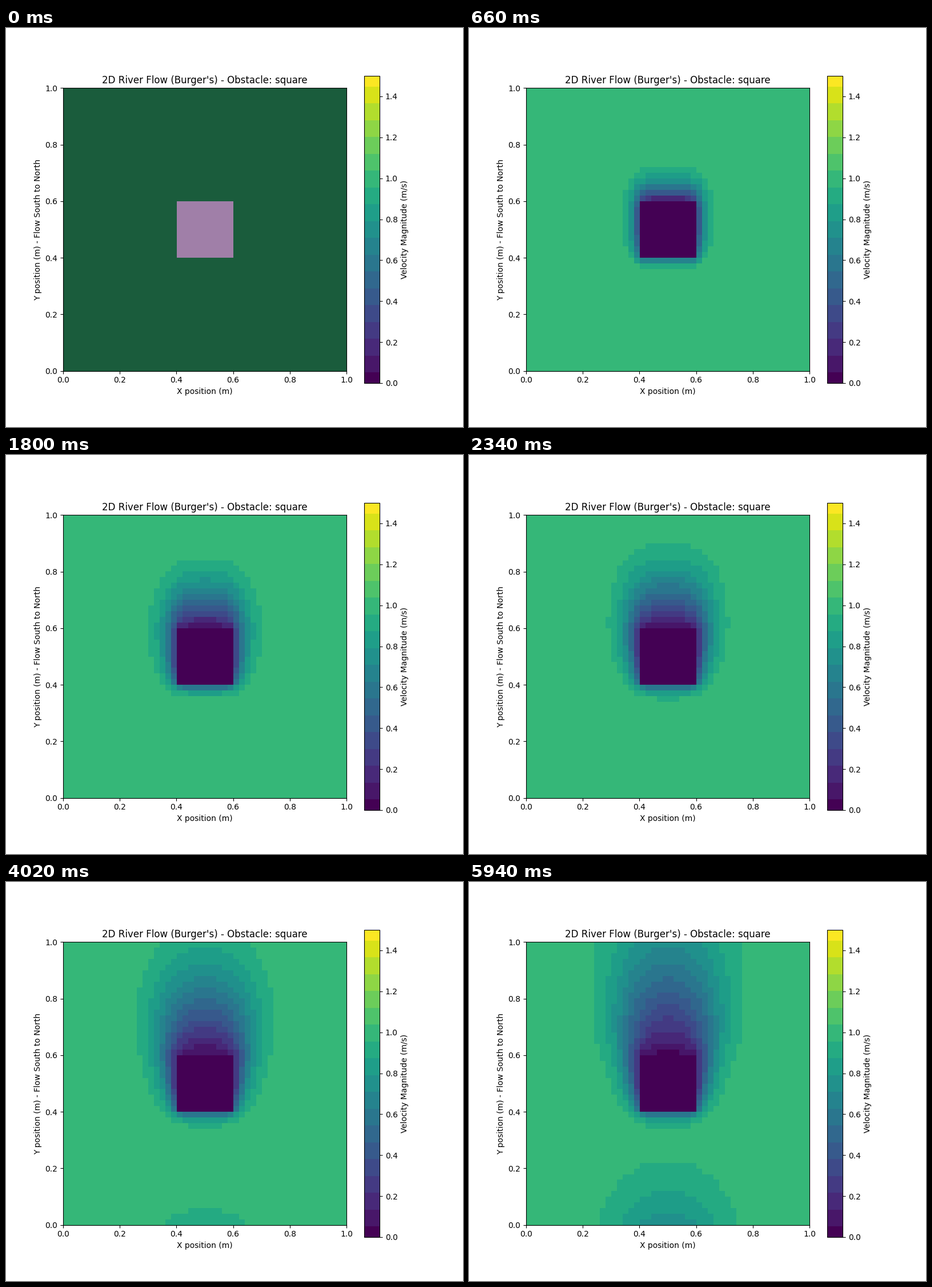
Animation, 800 px wide and 700 px high, one loop 6 s. Source, as a matplotlib script:

```python
import numpy as np
import matplotlib.pyplot as plt
from matplotlib.animation import FuncAnimation
from matplotlib.colors import ListedColormap

N = 50              # grid points per side
FRAMES = 100
INTERVAL = 60       # ms
VMAX = 1.5
DX = 1 / (N - 1)
DT = 0.005
NU = 0.01           # viscosity
BAND = 0.0825       # speed range sharing one colour
FIRST_BAND = 0.05


def banded_viridis():
    """Viridis reduced to flat bands, each with the colour of its middle."""
    values = np.linspace(0, VMAX, 256)
    band = np.floor((values - FIRST_BAND) / BAND)
    mids = FIRST_BAND + (band + 0.5) * BAND
    mids[values < FIRST_BAND] = 0
    return ListedColormap(plt.get_cmap("viridis")(mids / VMAX))


def step(v):
    """One upwind Burgers step with viscosity, periodic on all sides."""
    south, north = np.roll(v, 1, 0), np.roll(v, -1, 0)
    west, east = np.roll(v, 1, 1), np.roll(v, -1, 1)
    advection = v * (v - south) / DX
    diffusion = NU * (south + north + west + east - 4 * v) / DX**2
    return np.where(mask, 0, v + DT * (diffusion - advection))


x, y = np.meshgrid(np.linspace(0, 1, N), np.linspace(0, 1, N))
mask = np.maximum(abs(x - 0.5), abs(y - 0.5)) < 0.1

fields = [np.where(mask, 0.0, 1.0)]
while len(fields) < FRAMES:
    fields.append(step(fields[-1]))

fig, ax = plt.subplots(figsize=(8, 7), dpi=100)
grid = dict(origin="lower", extent=(0, 1, 0, 1), interpolation="nearest")
flow = ax.imshow(fields[0], cmap=banded_viridis(), vmin=0, vmax=VMAX, **grid)
fig.colorbar(flow, ax=ax, label="Velocity Magnitude (m/s)")
overlay = ax.imshow(mask.astype(float), cmap="gray", alpha=0.5, **grid)
ax.set_title("2D River Flow (Burger's) - Obstacle: square")
ax.set_xlabel("X position (m)")
ax.set_ylabel("Y position (m) - Flow South to North")


def update(i):
    flow.set_data(fields[i])
    overlay.set_visible(i == 0)   # obstacle tint shows only at the start
    return flow, overlay


anim = FuncAnimation(fig, update, frames=FRAMES, interval=INTERVAL,
                     repeat=True, repeat_delay=0, blit=False)
plt.show()
```
